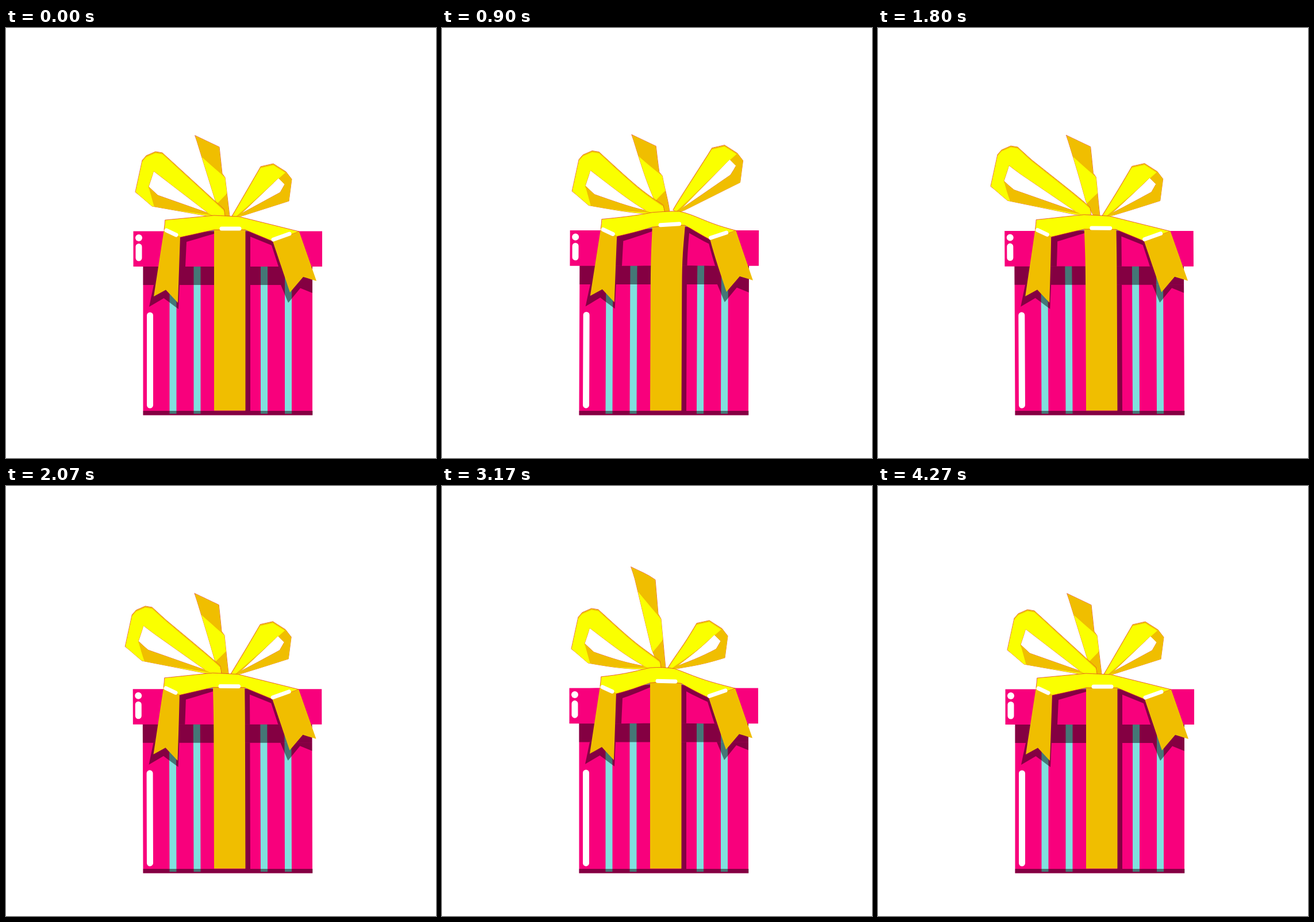
These frames come from a looping animation (748x748 px, 4.31 s). An HTML page with a canvas:

```html
<!DOCTYPE html>
<html>
<head>
<meta charset="utf-8">
<style>
html, body { margin: 0; width: 100%; height: 100%; overflow: hidden; background: #fff; }
canvas { display: block; width: 748px; height: 748px; }
</style>
</head>
<body>
<canvas id="stage" width="748" height="748"></canvas>
<script>
const ctx = document.getElementById('stage').getContext('2d');
const LOOP = 4310;
const PINK = '#f8007c', GOLD = '#f0be00', YELLOW = '#faff00', CYAN = '#80e0de';
const SHADE = 'rgba(0,0,0,.47)', EDGE = '#e03c28';

// A bow loop: where it is tied, its length, outline, hole and the area of the fold.
const mid = {
  root: [385, 328], reach: 130,
  outline: [329,187, 371,207, 376,253, 381,260, 389,327, 378,327, 365,303],
  fold: [340,224, 390,268, 390,282, 360,313]
};
const left = {
  root: [360, 328], reach: 110,
  outline: [225,285, 237,230, 244,222, 260,215, 272,217, 379,315, 381,328, 350,327, 254,310],
  hole: [257,249, 352,322, 264,291, 248,276],
  fold: [360,326, 248,276, 258,312]
};
const right = {
  root: [408, 328], reach: 88,
  outline: [393,327, 443,241, 465,236, 487,250, 497,263, 492,301, 404,329],
  hole: [474,261, 485,272, 477,286, 409,323],
  fold: [400,328, 490,248, 520,310]
};

// Each pull drags one loop out and back at constant speed.
const pulls = [
  { loop: right, move: [32, -39], start: 433, end: 1233, drag: .24 },
  { loop: left, move: [-38, -13], start: 1533, end: 2235, drag: .08 },
  { loop: mid, move: [0, -55], start: 2800, end: 3440, drag: .2 },
  { loop: left, move: [14, -17], start: 3750, end: 4250, drag: .08 }
];
let now = 0;

const clamp = v => Math.max(0, Math.min(1, v));
const mix = (a, b, t) => a + (b - a) * t;

// The pulled loop moves most, the knot less, the box only leans.
function warp(x, y, loop) {
  let dx = 0, dy = 0;
  for (const p of pulls) {
    const phase = (now - p.start) / (p.end - p.start);
    const pull = Math.max(0, 1 - Math.abs(2 * phase - 1));
    const d = Math.hypot(x - p.loop.root[0], y - p.loop.root[1]);
    const weight = loop === p.loop
      ? mix(.2, 1, clamp(d / loop.reach))
      : .045 * clamp((666 - y) / 310) + p.drag * Math.exp(-((d / 55) ** 2));
    dx += p.move[0] * pull * weight;
    dy += p.move[1] * pull * weight;
  }
  return [x + dx, y + dy];
}

// Adds a closed outline, its sides split so that they bend with the warp.
function trace(pts, loop, shift = 0) {
  for (let i = 0; i < pts.length; i += 2) {
    const j = (i + 2) % pts.length;
    const steps = Math.ceil(Math.hypot(pts[j] - pts[i], pts[j + 1] - pts[i + 1]) / 12);
    for (let s = 0; s < steps; s++) {
      const [x, y] = warp(mix(pts[i], pts[j], s / steps), mix(pts[i + 1], pts[j + 1], s / steps), loop);
      ctx[i || s ? 'lineTo' : 'moveTo'](x, y + shift);
    }
  }
  ctx.closePath();
}

function shape(color, pts, loop) {
  ctx.beginPath();
  trace(pts, loop);
  ctx.fillStyle = color;
  ctx.fill();
}

function outline() {
  ctx.strokeStyle = EDGE;
  ctx.lineWidth = .8;
  ctx.stroke();
}

const box = (color, x1, y1, x2, y2) => shape(color, [x1, y1, x2, y1, x2, y2, x1, y2]);

function shine(x1, y1, x2, y2, width) {
  ctx.beginPath();
  ctx.moveTo(...warp(x1, y1));
  ctx.lineTo(...warp(x2, y2));
  ctx.strokeStyle = '#fff';
  ctx.lineCap = 'round';
  ctx.lineWidth = width;
  ctx.stroke();
}

function drawLoop(loop, base, foldColor) {
  const ring = shift => {
    ctx.beginPath();
    trace(loop.outline, loop, shift);
    if (loop.hole) trace(loop.hole, loop, shift);
  };
  ctx.save();
  ring(0);
  outline();
  ctx.clip('evenodd');
  ctx.fillStyle = GOLD;
  ctx.fill('evenodd');
  ring(2.5); // leaves a gold rim along the top
  ctx.fillStyle = base;
  ctx.fill('evenodd');
  shape(foldColor, loop.fold, loop);
  ctx.restore();
}

// A ribbon end with a notch, hanging from a to b and ending at c and d.
function tail(color, [ax, ay], [bx, by], [cx, cy], [dx, dy]) {
  shape(color, [ax, ay, bx, by, cx, cy, (cx + dx) / 2, (cy + dy) / 2 - 17, dx, dy]);
}

function drawBox() {
  box(PINK, 238.5, 408, 533, 673.5);
  for (const x of [284.5, 326.5, 443, 485]) box(CYAN, x, 408, x + 12, 671);
  box(SHADE, 238.5, 666, 533.5, 673.5);
  box(SHADE, 238.5, 408, 533, 447);
  tail(SHADE, [257, 447], [302, 447], [300, 489], [249, 485]);
  tail(SHADE, [478, 447], [533, 447], [533, 461], [491, 478]);
  box(SHADE, 416, 447, 425, 666);
  box(PINK, 221.5, 353.5, 550, 415);
  shape(SHADE, [300,363, 362,351, 362,358, 314,372, 312,415, 300,415]);
  shape(SHADE, [416,351, 464,369, 482,415, 474,415, 462,378, 425,363, 425,415, 416,415]);
  box(GOLD, 362, 350, 416.5, 665.5);
  shine(250.5, 500, 250.5, 656, 11);
  shine(231, 365, 231, 365.01, 12);
  shine(231, 380.5, 231, 400, 11);
}

function drawBow() {
  drawLoop(mid, GOLD, YELLOW);
  drawLoop(left, YELLOW, GOLD);
  drawLoop(right, YELLOW, GOLD);
  shape(YELLOW, [277,334, 362,326, 405,328, 510,354, 464,371, 416,351, 362,351, 303,364, 275,351]);
  outline();
  tail(GOLD, [275, 350], [303, 363], [299, 478], [257, 467]);
  tail(GOLD, [464, 371], [510, 354], [540, 440], [494, 460]);
  shine(279, 352, 296, 360, 7);
  shine(375, 349, 406, 349, 7);
  shine(465, 368, 493, 358, 7);
}

function frame() {
  now = performance.now() % LOOP;
  ctx.clearRect(0, 0, 748, 748);
  drawBox();
  drawBow();
  requestAnimationFrame(frame);
}
frame();
</script>
</body>
</html>
```
